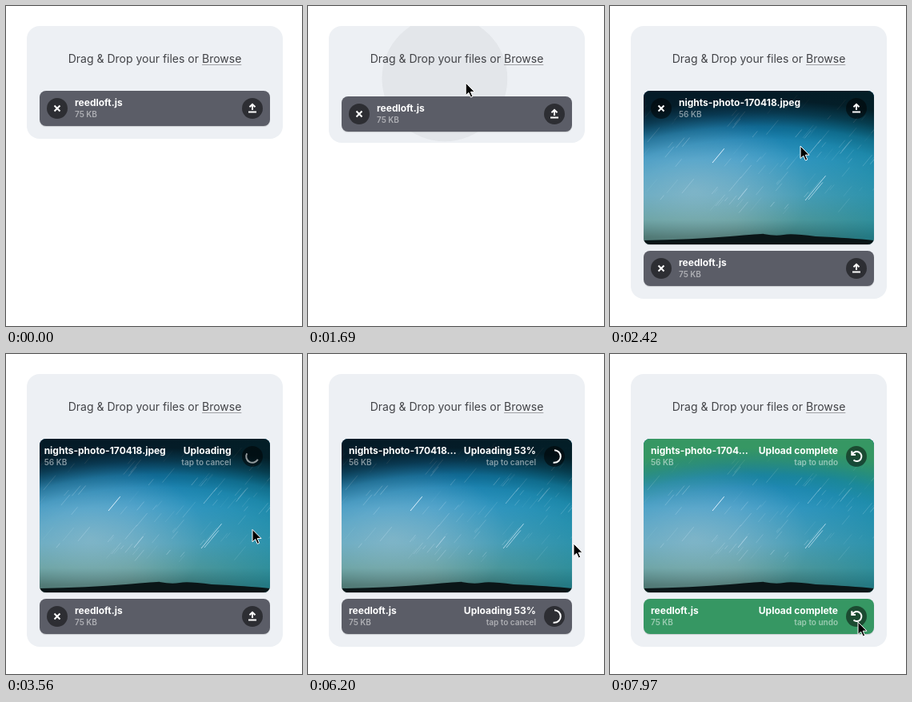
Animation of 370x400 px, one loop 8000 ms. Source, as an HTML page:

```html
<!DOCTYPE html>
<html lang="en">
<head>
<meta charset="utf-8">
<title>File upload</title>
<style>
  html, body { margin: 0; width: 100%; height: 100%; overflow: hidden; background: #fff; }
  body { position: relative; font-family: Inter, sans-serif; }
  .panel, .blob, .label, .item, .photo, .row, .button, .cursor { position: absolute; }
  .panel { left: 26px; top: 25px; width: 320px; border-radius: 16px; background: #edf0f4; overflow: hidden; }
  .blob { left: -64px; top: -64px; width: 128px; height: 128px; border-radius: 50%; background: #292c35; }
  .label { left: 26px; top: 56px; width: 320px; line-height: 20px; font-size: 14px; text-align: center; color: #424347; }
  .label span { text-decoration: underline 1px #a0a1a5; text-underline-offset: 2px; }
  .item { left: 42px; top: 106px; width: 288px; height: 44px; border-radius: 8px; background: #5b5d67;
          overflow: hidden; box-shadow: 0 1px 1px rgba(0, 0, 0, .15); }
  .photo { left: 0; top: 0; }
  .row { left: 9px; right: 45px; top: 7px; display: flex; color: #fff; white-space: nowrap; }
  .info { flex: 1; min-width: 0; margin-right: 9px; }
  .status { text-align: right; }
  .main { font-size: 12px; line-height: 16px; font-weight: 700; overflow: hidden; text-overflow: ellipsis; }
  .sub { font-size: 10px; line-height: 12px; font-weight: 600; opacity: .5; }
  .button { top: 9px; left: 253px; width: 26px; height: 26px; border-radius: 50%; background: rgba(0, 0, 0, .5); }
  .button.remove { left: 9px; }
  .button svg { display: block; fill: none; stroke: #fff; stroke-width: 2; }
  .cursor { left: 1px; top: 0; overflow: visible; }
</style>
</head>
<body>
<div class="panel"><div class="blob"></div></div>
<div class="label">Drag &amp; Drop your files or <span>Browse</span></div>
<svg class="cursor" width="12" height="19">
  <path d="M0 0V15.5L3.7 12.2 6.3 18 8.7 17 6.2 11.2H11Z" stroke="#fff" stroke-width="1"/>
</svg>

<script>
const LOOP = 8000;
const HOVER = 1150, DROP = 1650, INSERT = 1700, PREVIEW = 1820;
const PROGRESS = 5100, COMPLETE = 7175;

const $ = (selector, root = document) => root.querySelector(selector);
const ramp = (t, start, length = 250) => Math.min(1, Math.max(0, (t - start) / length));

// Underdamped spring from 0 to 1, with about 10% overshoot.
function settle(t, start) {
  const ms = t - start;
  if (ms <= 0) return 0;
  if (ms > 600) return 1;
  const w = .01178, decay = .00878;
  return 1 - Math.exp(-decay * ms) * (Math.cos(w * ms) + decay / w * Math.sin(w * ms));
}

// Cursor path: time, x, y
const path = [
  [0, 10, -22], [770, 10, -22], [1100, 50, 50], [1450, 120, 84], [1690, 196, 96],
  [1900, 224, 140], [2420, 237, 175], [3060, 308, 126], [3290, 308, 126], [3560, 307, 219],
  [3900, 309, 329], [4390, 309, 329], [4660, 322, 287], [5000, 329, 255], [5400, 332, 238],
  [6200, 331, 237], [6520, 331, 237], [7300, 350, 322], [7550, 338, 343], [7970, 309, 335],
  [LOOP, 309, 335]
];

function slope(i, axis) {
  if (!path[i - 1] || !path[i + 1]) return 0;
  const rate = (a, b) => (b[axis] - a[axis]) / (b[0] - a[0]);
  const before = rate(path[i - 1], path[i]), after = rate(path[i], path[i + 1]);
  return before * after <= 0 ? 0 : 2 * before * after / (before + after);
}

function cursorAt(t) {
  const i = Math.max(0, path.findIndex(key => key[0] > t) - 1);
  const a = path[i], b = path[i + 1], span = b[0] - a[0], u = (t - a[0]) / span;
  return [1, 2].map(axis => {
    const ease = u * u * (3 - 2 * u);
    return a[axis] + (b[axis] - a[axis]) * ease
      + span * u * (1 - u) * ((1 - u) * slope(i, axis) - u * slope(i + 1, axis));
  });
}

const icons = {
  remove: '<path d="M9.5 9.5l7 7m0-7l-7 7"/>',
  upload: '<path d="M8 17.5H18M13 15V8M9.5 11.3L13 7.8l3.5 3.5"/>',
  progress: '<circle cx="13" cy="13" r="7.8" pathLength="100"/>',
  undo: '<path d="M8 10.5A6 6 0 1 1 9.5 17.6M7.3 6.3V11H12"/>'
};

function makeItem(name, size, click) {
  const el = document.createElement('div');
  el.className = 'item';
  el.innerHTML = `
    <div class="row">
      <div class="info"><div class="main">${name}</div><div class="sub">${size}</div></div>
      <div class="status"><div class="main"></div><div class="sub"></div></div>
    </div>` + Object.keys(icons).map(kind =>
      `<div class="button ${kind}"><svg width="26" height="26">${icons[kind]}</svg></div>`).join('');
  $('.cursor').before(el);
  return { el, click };
}

function makePhoto() {
  let seed = 11;
  const random = () => (seed = seed * 16807 % 2147483647) / 2147483647;
  const streak = (x, y, length, alpha) =>
    `<path d="M${x} ${y}l${length * .64} ${-length * .77}" stroke="#dff2ff" stroke-opacity="${alpha}"/>`;
  let streaks = streak(86, 90, 23, 1) + streak(202, 137, 40, .7) + streak(206, 136, 28, .6)
    + streak(205, 81, 26, .4) + streak(118, 136, 18, .5);
  for (let i = 0; i < 95; i++)
    streaks += streak(random() * 288, 20 + random() * 135, 6 + random() * 18, .06 + random() * .25);
  const stops = list => list.map(([at, color, alpha = 1]) =>
    `<stop offset="${at}" stop-color="${color}" stop-opacity="${alpha}"/>`).join('');
  const shade = (id, color) => `<radialGradient id="${id}" cx=".5" cy="1.25" r="1.15">${stops(
    [[.5, color, 0], [.63, color, .04], [.75, color, .23], [.88, color, .7], [1, color]])}</radialGradient>`;
  return `<svg class="photo" width="288" height="192">
    <defs>
      <linearGradient id="sky" x2="0" y2="1">${stops([[0, '#0f6698'], [.25, '#157fb3'], [.45, '#3d9bc9'],
        [.68, '#5ba5bf'], [.84, '#619d9c'], [.95, '#456f69']])}</linearGradient>
      <linearGradient id="teal">${stops([[.4, '#08839b', 0], [1, '#08839b', .55]])}</linearGradient>
      <radialGradient id="glow" cx=".22" cy=".65" r=".5">${stops([[0, '#a3c4cf', .5], [1, '#a3c4cf', 0]])}</radialGradient>
      ${shade('dark', '#000')}${shade('green', '#369763')}
    </defs>
    <rect width="288" height="192" fill="url(#sky)"/>
    <rect width="288" height="192" fill="url(#teal)"/>
    <rect width="288" height="192" fill="url(#glow)"/>
    ${streaks}
    <path d="M0 187Q60 186 108 182T150 179Q165 182 175 180T215 182Q260 184 288 187V192H0Z" fill="#0a1517"/>
    <rect class="idle" width="288" height="115" fill="url(#dark)"/>
    <rect class="done" width="288" height="115" fill="url(#green)"/>
  </svg>`;
}

const image = makeItem('nights-photo-170418.jpeg', '56 KB', 3290);
const script = makeItem('reedloft.js', '75 KB', 4390);
image.el.insertAdjacentHTML('afterbegin', makePhoto());

function setButton(el, kind, opacity, scale = 1) {
  const { style } = $('.' + kind, el);
  style.opacity = opacity;
  style.transform = `scale(${scale})`;
}

function drawItem({ el, click }, t) {
  const moved = settle(t, click), leaving = ramp(t, click);
  const done = ramp(t, COMPLETE), complete = t >= COMPLETE, measured = t >= PROGRESS;
  const progress = ramp(t, PROGRESS, COMPLETE - PROGRESS) * 100;

  $('.info', el).style.transform = `translateX(${35 * (1 - moved)}px)`;
  const status = $('.status', el);
  status.style.transform = `translateX(${35 * (1 - moved)}px)`;
  status.style.opacity = leaving;
  $('.main', status).textContent = complete ? 'Upload complete'
    : measured ? `Uploading ${Math.floor(progress)}%` : 'Uploading';
  $('.sub', status).textContent = complete ? 'tap to undo' : 'tap to cancel';

  setButton(el, 'remove', 1 - leaving, 1 - .25 * moved);
  setButton(el, 'upload', 1 - leaving, 1 - .25 * moved);
  setButton(el, 'progress', leaving * (1 - done));
  setButton(el, 'undo', ramp(t, COMPLETE + 150), .75 + .25 * settle(t, COMPLETE + 150));

  const ring = $('.progress circle', el);
  const turn = measured ? 0 : (t - click + 60) * .36;
  ring.setAttribute('stroke-dasharray', `${measured ? progress : 50} 200`);
  ring.setAttribute('transform', `rotate(${turn - 90} 13 13)`);
  ring.setAttribute('opacity', ramp(t, click + 130));

  const mix = (from, to) => from + (to - from) * done;
  el.style.backgroundColor = `rgb(${mix(91, 54)}, ${mix(93, 151)}, ${mix(103, 99)})`;
}

function draw(t) {
  const hover = settle(t, HOVER), insert = settle(t, INSERT), preview = settle(t, PREVIEW);

  $('.panel').style.height = 141 + 5 * hover + 47 * insert + 148 * preview + 'px';
  script.el.style.top = 106 + 7 * hover + 45 * insert + 148 * preview + 'px';
  image.el.style.height = 44 + 148 * preview + 'px';
  image.el.style.opacity = ramp(t, INSERT);
  image.el.style.transform = `scale(${t < PREVIEW + 600 ? .8 + .2 * insert : 1})`;
  $('.photo').style.opacity = ramp(t, PREVIEW, 400);
  $('.idle').style.opacity = .75 * (1 - ramp(t, COMPLETE));
  $('.done').style.opacity = ramp(t, COMPLETE);
  drawItem(image, t);
  drawItem(script, t);

  const [x, y] = cursorAt(t);
  $('.cursor').style.transform = `translate(${x}px, ${y}px)`;

  // The drop highlight trails the cursor.
  const [bx, by] = cursorAt(Math.max(0, t - 90));
  const blob = $('.blob').style;
  blob.opacity = .06 * ramp(t, HOVER) * (1 - ramp(t, DROP));
  blob.transform = `translate(${bx - 26}px, ${by - 25}px) scale(${2.5 - 1.5 * hover + 1.5 * settle(t, DROP)})`;
}

const begin = performance.now();
function frame() {
  draw((performance.now() - begin) % LOOP);
  requestAnimationFrame(frame);
}
frame();
</script>
</body>
</html>
```
